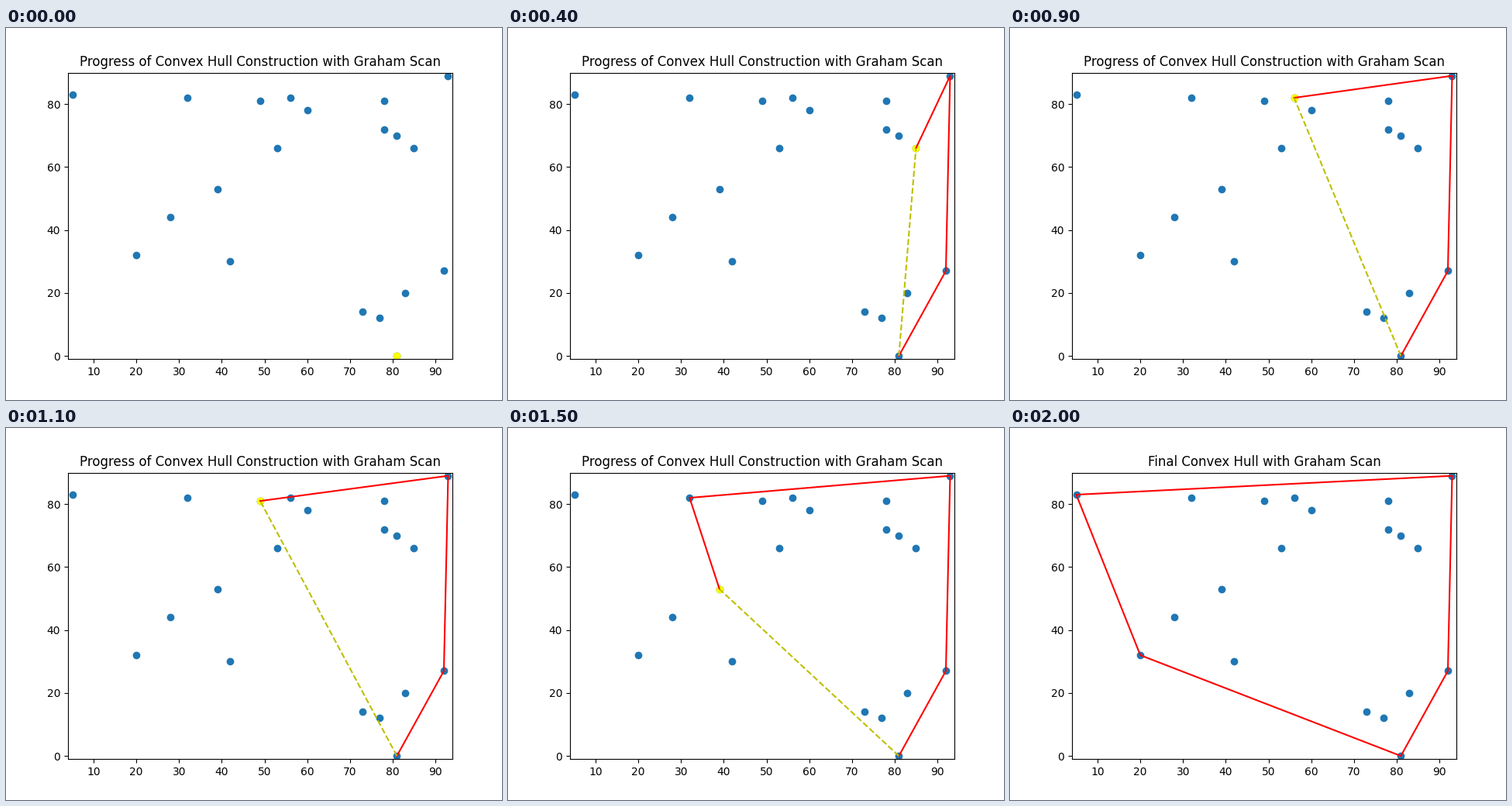
Animation, 640 px wide and 480 px high, one loop 2100 ms. Source, as a matplotlib script:

```python
import matplotlib.pyplot as plt
from matplotlib.animation import FuncAnimation
import numpy as np

# The scattered input; hull, order and motion all follow from it.
POINTS = [
    (5, 83), (20, 32), (28, 44), (32, 82), (39, 53), (42, 30), (49, 81),
    (53, 66), (56, 82), (60, 78), (73, 14), (77, 12), (78, 72), (78, 81),
    (81, 0), (81, 70), (83, 20), (85, 66), (92, 27), (93, 89),
]


def cross(o, a, b):
    return (a[0] - o[0]) * (b[1] - o[1]) - (a[1] - o[1]) * (b[0] - o[0])


def scan_steps(points):
    """Return the stack after each point of a Graham scan."""
    start = min(points, key=lambda p: (p[1], p[0]))
    rest = sorted((p for p in points if p != start),
                  key=lambda p: np.arctan2(p[1] - start[1], p[0] - start[0]))
    stack, steps = [], []
    for p in [start] + rest:
        while len(stack) > 1 and cross(stack[-2], stack[-1], p) <= 0:
            stack.pop()
        stack.append(p)
        steps.append(list(stack))
    return steps


steps = scan_steps(POINTS)
xs, ys = zip(*POINTS)

fig, ax = plt.subplots(figsize=(6.4, 4.8), dpi=100)
ax.set(xlim=(min(xs) - 1, max(xs) + 1), ylim=(min(ys) - 1, max(ys) + 1))
ax.scatter(xs, ys, color="tab:blue")
current = ax.scatter([], [], color="yellow")
hull, = ax.plot([], [], "r-")
closing, = ax.plot([], [], "y--")
title = ax.set_title("")


def update(i):
    done = i == len(steps)
    stack = steps[-1] if done else steps[i]
    path = stack + stack[:1] if done else stack
    hull.set_data(*zip(*path))
    closing.set_data(*zip(stack[0], stack[-1]))
    closing.set_visible(not done)
    current.set_offsets(stack[-1:])
    current.set_visible(not done)
    title.set_text("Final Convex Hull with Graham Scan" if done else
                   "Progress of Convex Hull Construction with Graham Scan")
    return hull, closing, current, title


anim = FuncAnimation(fig, update, frames=len(steps) + 1, interval=100,
                     repeat=True, repeat_delay=0, blit=False)
plt.show()
```
